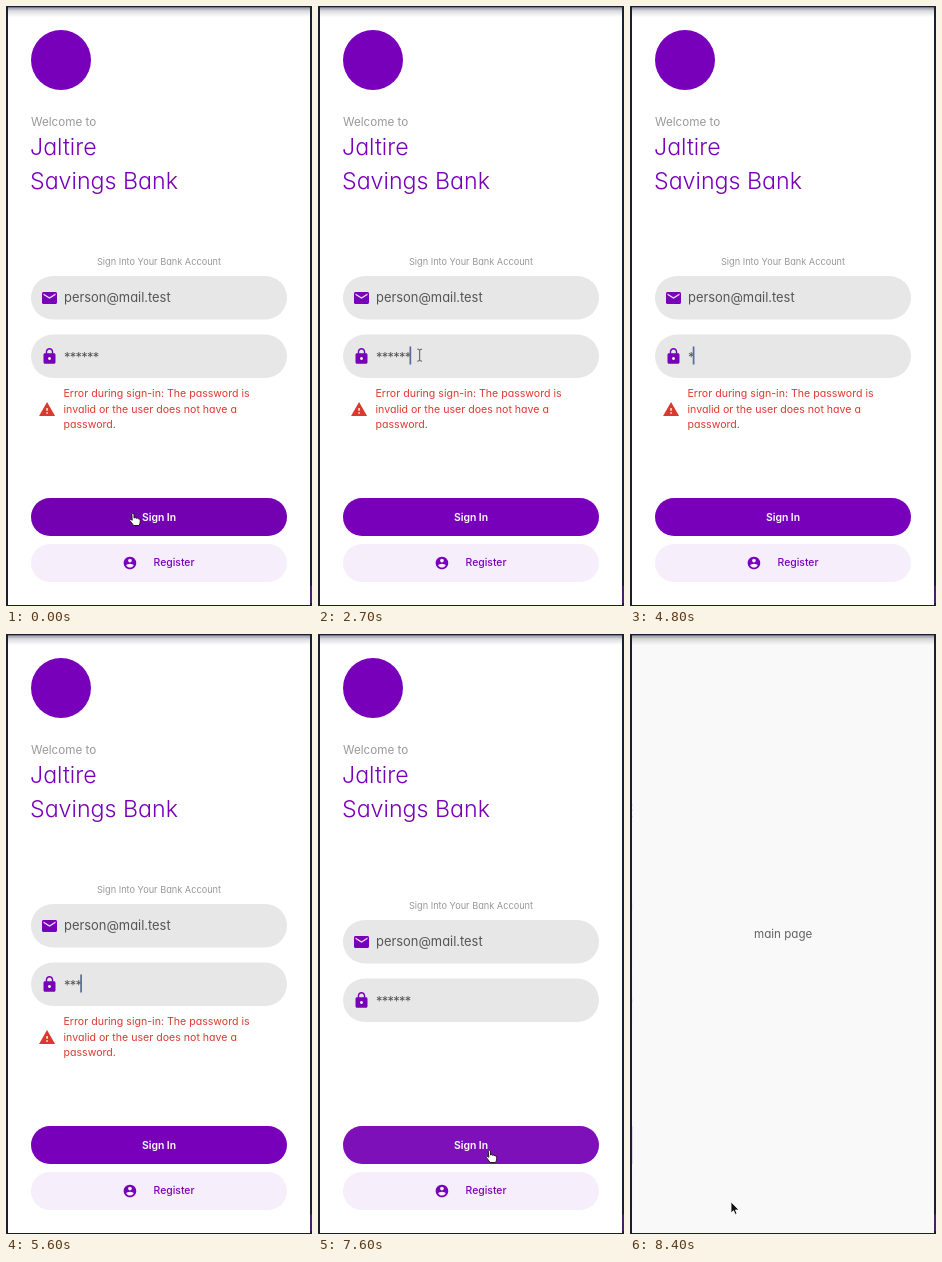
These frames come from a looping animation (306 by 600 pixels, 8500 ms). An HTML page:

```html
<!DOCTYPE html>
<html lang="en">
<head>
<meta charset="utf-8">
<title>Sign in</title>
<style>
  html, body { margin: 0; width: 100%; height: 100%; overflow: hidden; background: #fff; }
  svg { display: block; width: 306px; height: 600px; }
  text { font-family: Inter, "Open Sans", sans-serif; font-feature-settings: "cv11"; }
  .brand { fill: #7800ba; }
  .title { font-size: 23.2px; font-weight: 300; }
  .muted { fill: #999; }
  .entry { font-size: 12.9px; fill: #555; }
  .hint { font-size: 12.7px; fill: #7b7b7b; }
  .field { fill: #e7e7e7; }
  .error { fill: #d93a30; font-size: 10.6px; }
  .action { font-size: 10.4px; font-weight: 600; }
  .cursor { stroke-linejoin: round; stroke-linecap: round; }
</style>
</head>
<body>
<svg viewBox="0 0 306 600">
  <defs>
    <linearGradient id="topShade" x2="0" y2="1">
      <stop offset="0" stop-color="#1a2036" stop-opacity=".5"/>
      <stop offset=".4" stop-color="#1a2036" stop-opacity=".16"/>
      <stop offset="1" stop-color="#1a2036" stop-opacity="0"/>
    </linearGradient>
    <linearGradient id="edgeShade">
      <stop offset="0" stop-opacity="0"/>
      <stop offset=".6" stop-opacity=".06"/>
      <stop offset="1" stop-opacity=".26"/>
    </linearGradient>
  </defs>
  <rect width="306" height="600" fill="#fff"/>

  <g id="login">
    <circle class="brand" cx="55" cy="54" r="30"/>
    <text class="muted" x="25" y="119.5" font-size="11.7">Welcome to</text>
    <text class="brand title" x="24" y="149">Jaltire</text>
    <text class="brand title" x="24" y="182.5">Savings Bank</text>

    <g id="form">
      <text class="muted" x="153" y="258.5" font-size="9.2" text-anchor="middle">Sign Into Your Bank Account</text>
      <rect class="field" x="25" y="270" width="256" height="43.5" rx="21.75"/>
      <rect class="field" x="25" y="328.5" width="256" height="43.5" rx="21.75"/>
      <path class="brand" transform="translate(34.5 283) scale(.75)" d="M20 4H4c-1.1 0-2 .9-2 2v12c0 1.1.9 2 2 2h16c1.1 0 2-.9 2-2V6c0-1.1-.9-2-2-2zm0 4l-8 5-8-5V6l8 5 8-5v2z"/>
      <path class="brand" transform="translate(34.5 341.3) scale(.75)" d="M18 8h-1V6c0-2.76-2.24-5-5-5S7 3.24 7 6v2H6c-1.1 0-2 .9-2 2v10c0 1.1.9 2 2 2h12c1.1 0 2-.9 2-2V10c0-1.1-.9-2-2-2zm-6 9c-1.1 0-2-.9-2-2s.9-2 2-2 2 .9 2 2-.9 2-2 2zm3.1-9H8.9V6c0-1.71 1.39-3.1 3.1-3.1 1.71 0 3.1 1.39 3.1 3.1v2z"/>
      <text id="email" class="entry" x="58" y="295.7">person@mail.test</text>
      <text id="emailHint" class="hint" x="58" y="295.7">Email</text>
      <text id="stars" class="entry" y="355.5"></text>
      <text id="passHint" class="hint" x="58" y="354.2">Password</text>
      <rect id="caret" y="340.5" width="1.7" height="18" fill="#5a6a9c"/>
    </g>

    <g id="error" class="error">
      <path transform="translate(32.3 394.6) scale(.73)" d="M1 21h22L12 2 1 21zm12-3h-2v-2h2v2zm0-4h-2v-4h2v4z"/>
      <text x="57.5" y="390.7">Error during sign-in: The password is</text>
      <text x="57.5" y="406.5">invalid or the user does not have a</text>
      <text x="57.5" y="422.2">password.</text>
    </g>

    <rect id="signIn" x="25" y="492" width="256" height="38" rx="19"/>
    <text class="action" x="153" y="514.7" text-anchor="middle" fill="#fff">Sign In</text>
    <rect x="25" y="538" width="256" height="38" rx="19" fill="#f6eefb"/>
    <path class="brand" transform="translate(116.4 549.5) scale(.63)" d="M12 2C6.48 2 2 6.48 2 12s4.48 10 10 10 10-4.48 10-10S17.52 2 12 2zm0 3c1.66 0 3 1.34 3 3s-1.34 3-3 3-3-1.34-3-3 1.34-3 3-3zm0 14.2c-2.5 0-4.71-1.28-6-3.22.03-1.99 4-3.08 6-3.08 1.99 0 5.97 1.09 6 3.08-1.29 1.94-3.5 3.22-6 3.22z"/>
    <text class="brand" x="168" y="560.3" text-anchor="middle" font-size="10.4" font-weight="500">Register</text>
  </g>

  <g id="page">
    <rect x="-16" width="16" height="600" fill="url(#edgeShade)"/>
    <rect width="306" height="600" fill="#f9f9f9"/>
    <text x="151" y="303.7" text-anchor="middle" font-size="11.6" fill="#626262">main page</text>
  </g>

  <rect y="1" width="306" height="10" fill="url(#topShade)"/>
  <path d="M0 0H306V600H0ZM2 1.3V599H304V1.3Z" fill="#192036" fill-rule="evenodd"/>
  <rect x="304" y="580" width="2" height="17" fill="#48206a"/>

  <g id="cursor" class="cursor">
    <path id="hand" fill="#fff" stroke="#111" stroke-width=".9" d="M-1 1Q0-.6 1 1V5Q2.4 4 3.2 5.3Q4.6 4.5 5.4 5.8Q7.2 5.4 7.2 7.2V9Q7 11 6 12.5H.6Q-1.2 10-3.3 7.3Q-3 5.4-1 7Z"/>
    <path id="beam" fill="none" stroke="#555" d="M-2-6Q0-6 0-5Q0-6 2-6M0-5V5M-2 6Q0 6 0 5Q0 6 2 6"/>
    <path id="arrow" fill="#111" stroke="#fff" stroke-width=".8" d="M0 0V11L2.5 8.7L4.2 12.4L6 11.6L4.4 8H7.8Z"/>
  </g>
</svg>
<script>
const LOOP = 8500, STEP = 100, WIDTH = 304;
const SLIDE_START = 7905, SLIDE_TIME = 500;

// [time, x, y] of the pointer tip
const POINTER = [
  [0, 127, 507], [700, 127, 507], [1600, 113, 347], [2000, 102, 349], [2500, 102, 349],
  [3300, 100, 350], [6200, 100, 350], [7100, 171, 517], [7200, 171, 517], [7400, 171.5, 516],
  [8000, 171.5, 516], [8100, 171.5, 515.5], [8400, 101, 568], [8500, 101, 568]
];
// [time, typed characters]
const TYPED = [
  [0, 6], [3500, 5], [3600, 4], [3700, 3], [3900, 2], [4000, 1], [4100, 0],
  [4800, 1], [5300, 2], [5600, 3], [5800, 4], [5900, 5], [6100, 6], [7900, 0]
];

const el = Object.fromEntries([...document.querySelectorAll("[id]")].map(n => [n.id, n]));
const clamp = v => Math.min(1, Math.max(0, v));
const within = (v, from, to) => v >= from && v < to;
const show = (node, on) => node.setAttribute("visibility", on ? "visible" : "hidden");
const move = (node, x, y) => node.setAttribute("transform", `translate(${x} ${y})`);
const latest = (table, t) => table.filter(row => row[0] <= t).pop();

function bezier(x1, y1, x2, y2) {
  const at = (s, a, b) => 3 * (1 - s) * (1 - s) * s * a + 3 * (1 - s) * s * s * b + s ** 3;
  return x => {
    let low = 0, high = 1;
    for (let i = 0; i < 24; i++) {
      const mid = (low + high) / 2;
      if (at(mid, x1, x2) < x) low = mid; else high = mid;
    }
    return at(high, y1, y2);
  };
}
const slideEase = bezier(.35, .91, .33, .97);

function pointerAt(t) {
  const i = POINTER.findIndex(row => row[0] > t);
  const [t0, x0, y0] = POINTER[i - 1], [t1, x1, y1] = POINTER[i];
  const k = (t - t0) / (t1 - t0), e = k * k * (3 - 2 * k);
  return [x0 + (x1 - x0) * e, y0 + (y1 - y0) * e];
}

function draw(t) {
  const slide = t < SLIDE_START ? 0 : slideEase(clamp((t - SLIDE_START) / SLIDE_TIME));
  const pageX = 2 + WIDTH * (1 - slide);
  move(el.page, pageX, 0);
  show(el.page, slide > 0);
  move(el.login, -slide * WIDTH / 3, 0);

  const accepted = t >= 7600, cleared = t >= 7900;
  move(el.form, 0, accepted ? 16 : 0);
  show(el.error, !accepted);
  show(el.email, !cleared);
  show(el.emailHint, cleared);

  const count = latest(TYPED, t)[1];
  el.stars.textContent = "*".repeat(count);
  el.stars.setAttribute("x", Array.from({ length: 6 }, (_, i) => 58 + i * 5.75).join(" "));
  const hintFade = cleared ? 1 : clamp((t - 4000) / 300);
  el.passHint.setAttribute("opacity", count ? 0 : hintFade);
  el.caret.setAttribute("x", 57 + count * 5.75);
  show(el.caret, within(t, 2600, 6700) && !within(t, 3000, 3300));

  const [x, y] = pointerAt(t);
  const covered = slide > 0 && x > pageX;
  const overButton = !covered && (within(y, 492, 530) || within(y, 538, 576));
  const overField = !covered && (within(y, 270, 313) || within(y, 329, 372));
  move(el.cursor, x, y);
  show(el.hand, overButton);
  show(el.beam, overField && !within(t, 3400, 6300));
  show(el.arrow, !overButton && !overField);

  const hovered = !covered && within(y, 492, 530);
  el.signIn.setAttribute("fill", !hovered ? "#7800ba" : accepted ? "#7d10b9" : "#7300b1");
}

function tick() {
  const t = performance.now() % LOOP;
  draw(Math.floor(t / STEP) * STEP);
  requestAnimationFrame(tick);
}
tick();
</script>
</body>
</html>
```
